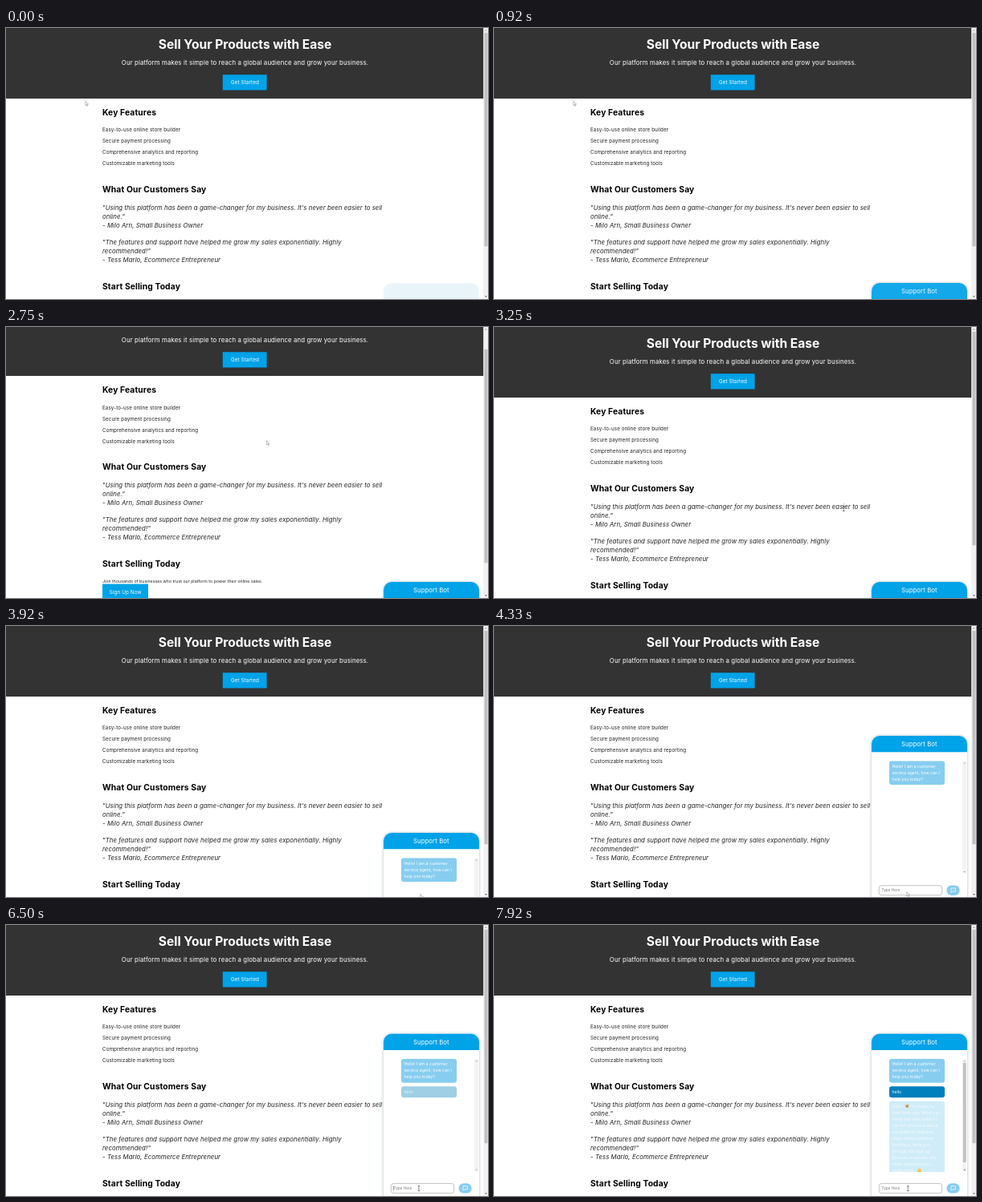
Write an HTML page with a canvas that moves like this. It is 600 by 338 pixels and loops after 8000 ms.

```html
<!DOCTYPE html>
<html lang="en">
<head>
<meta charset="utf-8">
<title>Store landing page with support chat</title>
<style>
  html, body { margin: 0; width: 100%; height: 100%; overflow: hidden; background: #fff; }
  canvas { display: block; width: 600px; height: 338px; }
</style>
</head>
<body>
<canvas id="stage"></canvas>
<script>
const W = 600, H = 338, LOOP = 8000;
const BLUE = '#00a2e8', PALE = '#87cdf0', DEEP = '#0080bc';
const canvas = document.getElementById('stage');
const ctx = canvas.getContext('2d');
const dpr = Math.max(1, window.devicePixelRatio || 1);
canvas.width = W * dpr;
canvas.height = H * dpr;

const clamp = v => Math.max(0, Math.min(1, v));
const span = (t, a, b) => clamp((t - a) / (b - a));
const smooth = p => p * p * (3 - 2 * p);
const easeOut = p => 1 - (1 - p) ** 3;

// CSS "ease" curve, solved by bisection
function ease(p) {
  let lo = 0, hi = 1, u = p;
  for (let i = 0; i < 20; i++) {
    u = (lo + hi) / 2;
    const x = 3 * (1 - u) ** 2 * u * 0.25 + 3 * (1 - u) * u * u * 0.25 + u ** 3;
    if (x < p) lo = u; else hi = u;
  }
  return 3 * (1 - u) ** 2 * u * 0.1 + 3 * (1 - u) * u * u + u ** 3;
}

function rect(x, y, w, h, color, r = 0) {
  ctx.fillStyle = color;
  ctx.beginPath();
  ctx.roundRect(x, y, w, h, r);
  ctx.fill();
}

function text(str, x, y, size, color, { style = '400', align = 'left', gap = 0.012 } = {}) {
  ctx.font = `${style} ${size}px Inter, "Open Sans", sans-serif`;
  ctx.letterSpacing = `${size * gap}px`;
  ctx.textAlign = align;
  ctx.fillStyle = color;
  ctx.fillText(str, x, y);
}

function lines(list, x, y, step, size, color, opts) {
  list.forEach((s, i) => text(s, x, y + i * step, size, color, opts));
}

function triangle(x, y, s, dir, color) {
  ctx.fillStyle = color;
  ctx.beginPath();
  ctx.moveTo(x - s, y + dir * s / 2);
  ctx.lineTo(x + s, y + dir * s / 2);
  ctx.lineTo(x, y - dir * s / 2);
  ctx.fill();
}

function button(label, x, y, w) {
  rect(x, y, w, 19.3, BLUE);
  text(label, x + w / 2 + 0.2, y + 12, 6.3, '#fff', { align: 'center', gap: 0.016 });
}

function page(scroll) {
  const h2 = { style: '700' }, quote = { style: 'italic 400', gap: 0.008 };
  ctx.save();
  ctx.translate(0, -scroll);
  rect(0, 0, 595, 88, '#333');
  text('Sell Your Products with Ease', 297.5, 26.3, 15.55, '#fff', { style: '700', align: 'center', gap: 0 });
  text('Our platform makes it simple to reach a global audience and grow your business.',
    297.5, 45.8, 7.8, '#fff', { align: 'center', gap: 0.016 });
  button('Get Started', 269.8, 58.2, 54.8);
  text('Key Features', 120, 108.8, 10.3, '#000', h2);
  lines(['Easy-to-use online store builder', 'Secure payment processing',
    'Comprehensive analytics and reporting', 'Customizable marketing tools'],
    120, 129.4, 14, 6.25, '#222', { gap: 0.014 });
  text('What Our Customers Say', 120, 205.1, 10.3, '#000', h2);
  lines(['"Using this platform has been a game-changer for my business. It\'s never been easier to sell',
    'online."', '- Milo Arn, Small Business Owner'], 120, 227.2, 10.9, 7.8, '#222', quote);
  lines(['"The features and support have helped me grow my sales exponentially. Highly',
    'recommended!"', '- Tess Marlo, Ecommerce Entrepreneur'], 120, 270.2, 10.9, 7.8, '#222', quote);
  text('Start Selling Today', 120, 326, 10.3, '#000', h2);
  text('Join thousands of businesses who trust our platform to power their online sales.',
    120, 345.5, 5.15, '#222');
  button('Sign Up Now', 120, 347.5, 57);
  ctx.restore();

  rect(594.2, 0, 5.8, H, '#f1f1f1');
  rect(595.5, 5.8 + scroll * 0.816, 4, 266.5, '#c1c1c1');
  triangle(597.4, 2.8, 1.4, 1, '#888');
  triangle(597.4, 335, 1.4, -1, '#555');
}

function emoji(x, y, wave) {
  ctx.fillStyle = wave ? '#c68642' : '#ffc83d';
  ctx.strokeStyle = wave ? '#c68642' : '#6b4a10';
  ctx.lineWidth = wave ? 0.8 : 0.4;
  ctx.beginPath();
  ctx.arc(x, y, wave ? 1.7 : 2.6, 0, 7);
  ctx.fill();
  ctx.beginPath();
  if (wave) {
    for (let a = -2.6; a < -0.4; a += 0.5) {
      ctx.moveTo(x, y);
      ctx.lineTo(x + 2.9 * Math.cos(a), y + 2.9 * Math.sin(a));
    }
  } else {
    ctx.arc(x, y + 0.1, 1.4, 0.2, 2.9);
  }
  ctx.stroke();
}

function bubble(y, h, color, list, alpha) {
  if (alpha <= 0) return;
  ctx.globalAlpha = alpha;
  rect(492, y, 69, h, color, 3);
  // white on a fading bubble stays solid so the words remain visible
  ctx.globalAlpha = Math.min(1, alpha * 2);
  lines(list, 495.5, y + 8.4, 8, 5.15, '#fff', { gap: 0 });
}

const GREETING = ['Hello! I am a customer', 'service agent, how can I', 'help you today?'];
const REPLY = ['Hello!      I\'m happy to', 'hear from you. What can', 'I help you with today? I',
  'can tell you more about', 'our platform features,', 'share some customer', 'feedback, walk you',
  'through the sign-up', 'process or answer any', 'other questions you', 'might have.'];

const KEYS = [5380, 5500, 5620, 5740, 5880], SENT = 6120, REPLIED = 7590;

function messages(t) {
  ctx.save();
  ctx.beginPath();
  ctx.rect(470, 167, 119, 141);
  ctx.clip();
  bubble(167, 29.7, PALE, GREETING, 1);
  bubble(201.3, 14, DEEP, ['hello'], span(t, SENT, SENT + 1000));
  const a = span(t, REPLIED, REPLIED + 850);
  bubble(219.7, 94, PALE, REPLY, a);
  if (a > 0) {
    emoji(514.3, 226.4, true);
    emoji(529.5, 306.2, false);
  }
  ctx.globalAlpha = 1;
  rect(583.2, 167, 5, 141, '#f3f3f3');
  if (a > 0) rect(583.8, 172, 3.9, 124, '#c1c1c1');
  triangle(585.7, 169.6, 1.3, 1, '#999');
  triangle(585.7, 305.4, 1.3, -1, a > 0 ? '#555' : '#999');
  ctx.restore();
}

function inputRow(t) {
  ctx.strokeStyle = '#aaa';
  ctx.lineWidth = 0.7;
  ctx.beginPath();
  ctx.roundRect(479.3, 322.4, 78.4, 12, 3);
  ctx.stroke();
  const typed = t < SENT ? 'hello'.slice(0, KEYS.filter(k => k <= t).length) : '';
  text(typed || 'Type Here', 482.5, 330, 4.6, typed ? '#222' : '#777');
  const since = t - (t < SENT ? 5120 : SENT);
  const typing = t >= KEYS[0] && t < SENT;
  if (since >= 0 && (typing || since % 1000 < 500)) {
    rect(482.3 + (typed ? ctx.measureText(typed).width : 0), 325.6, 0.4, 5.6, '#222');
  }
  rect(563.5, 322.2, 16.2, 12.4, PALE, 6);
  ctx.strokeStyle = '#fff';
  ctx.lineWidth = 0.7;
  ctx.lineJoin = 'round';
  ctx.beginPath();
  ctx.moveTo(569, 331.2);
  ctx.lineTo(569, 325.6);
  ctx.lineTo(574.3, 325.6);
  ctx.lineTo(574.3, 329.8);
  ctx.lineTo(570.4, 329.8);
  ctx.closePath();
  ctx.stroke();
}

function chat(t) {
  const open = ease(span(t, 3790, 4400));
  ctx.save();
  ctx.globalAlpha = clamp(0.06 + t * 0.00094);
  ctx.translate(0, 182.3 * (1 - open));
  ctx.shadowColor = 'rgba(0, 60, 90, 0.36)';
  ctx.shadowBlur = 3.5 * dpr;
  rect(470, 135.7, 119, 210, '#fff', [10, 10, 0, 0]);
  ctx.shadowColor = 'transparent';
  rect(470, 135.7, 119, 20.3, BLUE, [10, 10, 0, 0]);
  text('Support Bot', 529.3, 148.8, 7.75, '#fff', { align: 'center' });
  if (open > 0) {
    messages(t);
    inputRow(t);
  }
  ctx.restore();
}

const PATH = [[1000, 99, 91.5], [1750, 285, 118], [2200, 303.7, 126], [2600, 303.7, 126],
  [3200, 435.3, 226.5], [3350, 435.3, 226.5], [3680, 516, 328], [3900, 515.8, 334.5],
  [4100, 515.8, 334.5], [4600, 511.3, 328.3], [6200, 511.3, 328.3], [6700, 515.3, 328.6]];

function pointer(t) {
  const i = PATH.findIndex(k => k[0] > t);
  if (i === 0) return PATH[0].slice(1);
  if (i < 0) return PATH[PATH.length - 1].slice(1);
  const [t0, x0, y0] = PATH[i - 1], [t1, x1, y1] = PATH[i];
  const p = smooth((t - t0) / (t1 - t0));
  return [x0 + (x1 - x0) * p, y0 + (y1 - y0) * p];
}

function cursor(t) {
  const [x, y] = pointer(t);
  const beam = (t > 3080 && t < 3420) || t > 4450;
  ctx.save();
  ctx.translate(x, y);
  ctx.strokeStyle = beam ? '#333' : '#666';
  ctx.beginPath();
  if (beam) {
    ctx.lineWidth = 0.6;
    for (const d of [-1, 1]) {
      ctx.moveTo(-1.2, d * 3);
      ctx.lineTo(1.2, d * 3);
    }
    ctx.moveTo(0, -3);
    ctx.lineTo(0, 3);
  } else {
    ctx.lineWidth = 0.45;
    ctx.fillStyle = '#fff';
    ctx.moveTo(0, 0);
    ctx.lineTo(0, 5);
    ctx.lineTo(1.2, 4);
    ctx.lineTo(2.1, 5.8);
    ctx.lineTo(2.9, 5.4);
    ctx.lineTo(2.1, 3.7);
    ctx.lineTo(3.6, 3.6);
    ctx.closePath();
    ctx.fill();
  }
  ctx.stroke();
  ctx.restore();
}

function draw(t) {
  ctx.setTransform(dpr, 0, 0, dpr, 0, 0);
  rect(0, 0, W, H, '#fff');
  page(40 * (easeOut(span(t, 1850, 2100)) - easeOut(span(t, 2720, 2970))));
  chat(t);
  cursor(t);
}

const start = performance.now();
function tick() {
  draw((performance.now() - start) % LOOP);
  requestAnimationFrame(tick);
}
tick();
</script>
</body>
</html>
```
